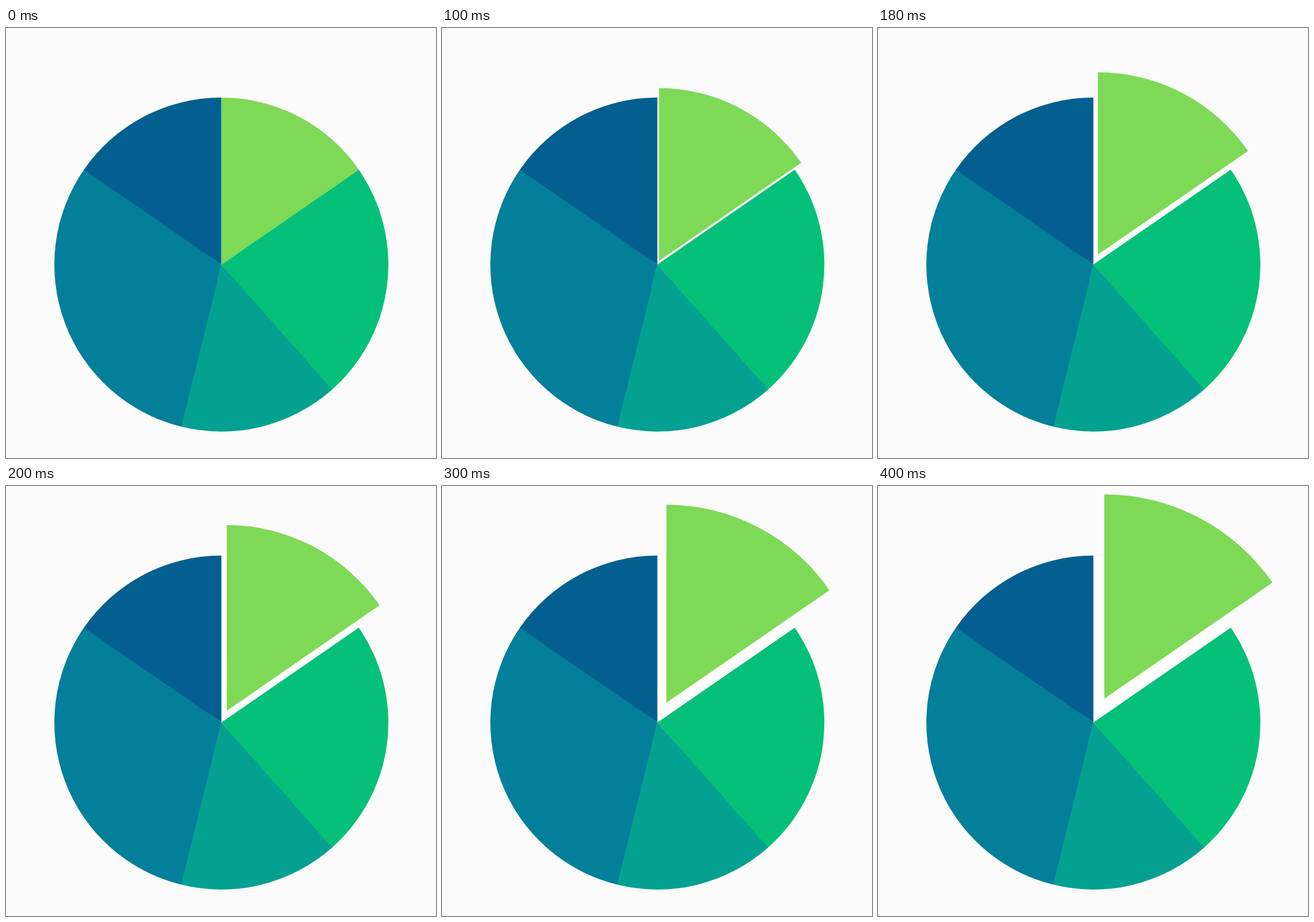
Write an HTML page that moves like this. It is 748 px wide and 748 px high and loops after 9080 ms.

```html
<!DOCTYPE html>
<html lang="en">
<head>
<meta charset="utf-8">
<title>Pie chart</title>
<style>
  html, body { margin: 0; width: 100%; height: 100%; overflow: hidden; background: #fbfbfb; }
  svg { display: block; width: 100%; height: 100%; }
</style>
</head>
<body>
<svg id="chart" viewBox="0 0 748 748"></svg>
<script>
const LOOP = 9080, STEP = 20, TOTAL = 13;
const CENTER = { x: 374.6, y: 411.5 }, RADIUS = 290.5;
const SLICES = [
  { from: 2, to: 5, color: '#04c078' },
  { from: 5, to: 7, color: '#04a190' },
  { from: 7, to: 11, color: '#037f99' },
  { from: 11, to: 13, color: '#035f8f' },
];
const LIFTED = { from: 0, to: 2, color: '#7ed957' };

// [time in ms, phase of the sine easing]
const PHASES = [[0, 0], [100, .257], [140, .337], [200, .498], [260, .638], [340, .823], [400, 1]];

const chart = document.getElementById('chart');

function addPath(attributes) {
  const path = document.createElementNS('http://www.w3.org/2000/svg', 'path');
  for (const [name, value] of Object.entries(attributes)) path.setAttribute(name, value);
  return chart.appendChild(path);
}

function rim(share, x, y, r) {
  const angle = share / TOTAL * 2 * Math.PI;
  return `${(x + r * Math.sin(angle)).toFixed(3)} ${(y - r * Math.cos(angle)).toFixed(3)}`;
}

function sector(from, to, x = CENTER.x, y = CENTER.y, r = RADIUS) {
  return `M${x} ${y}L${rim(from, x, y, r)}A${r} ${r} 0 0 1 ${rim(to, x, y, r)}Z`;
}

function progress(time) {
  const next = PHASES.findIndex(([t]) => t > time);
  if (next < 0) return 1;
  const [t0, p0] = PHASES[next - 1], [t1, p1] = PHASES[next];
  const phase = p0 + (p1 - p0) * (time - t0) / (t1 - t0);
  return (1 - Math.cos(Math.PI * phase)) / 2;
}

addPath({ d: sector(0, 2), fill: '#fdfefd', stroke: '#f2f6f2', 'stroke-width': .8 });
for (const { from, to, color } of SLICES) {
  // A slight overlap hides the seam under the next slice.
  addPath({ d: sector(from, to < TOTAL ? to + .02 : to), fill: color });
}
const lifted = addPath({ fill: LIFTED.color });

function render(time) {
  const k = progress(Math.floor(time / STEP) * STEP);
  lifted.setAttribute('d', sector(LIFTED.from, LIFTED.to,
    CENTER.x + 19 * k, CENTER.y - 41.5 * k, RADIUS + 65 * k));
}

const start = performance.now();
function tick() {
  render((performance.now() - start) % LOOP);
  requestAnimationFrame(tick);
}
tick();
</script>
</body>
</html>
```
